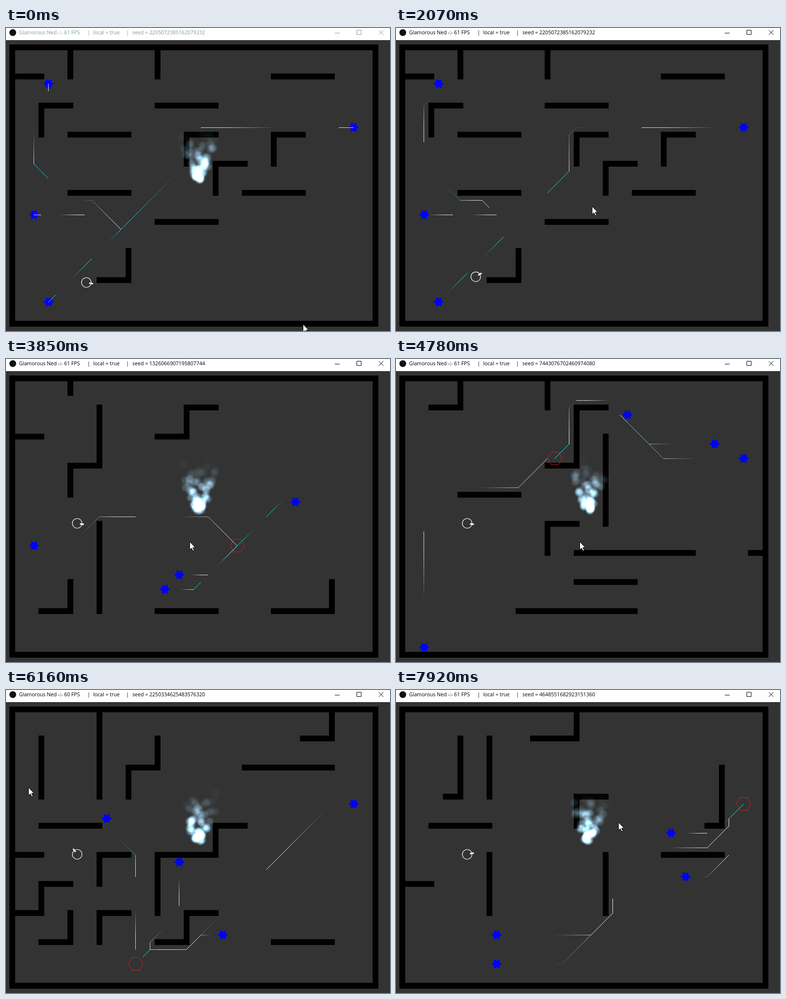
Recreate the animation shown at these times as an HTML page with a canvas. Size 793 px wide and 625 px high, loop 8000 ms.

```html
<!DOCTYPE html>
<html lang="en">
<head>
<meta charset="utf-8">
<title>Maze</title>
<style>
  html, body { margin: 0; width: 100%; height: 100%; overflow: hidden; background: #333; }
  canvas { position: absolute; left: 0; top: 0; }
  #bar {
    position: absolute; left: 0; top: 0; width: 793px; height: 25px; background: #fff;
    font: 10.6px/19px "Open Sans", "Noto Sans", sans-serif; color: #000; white-space: pre;
  }
  #bar.idle { color: #7f9a9c; }
  #bar span { position: absolute; top: 0; }
  #bar svg { position: absolute; left: 0; top: 0; fill: none; stroke: currentColor; }
</style>
</head>
<body>
<div id="bar">
  <svg width="793" height="25">
    <circle cx="14" cy="9.5" r="7" fill="#111" stroke="none"/>
    <path d="M679 10.5h10M724.5 4.5h9v9h-9zM770 4.5l9.5 9.5M779.5 4.5l-9.5 9.5"/>
  </svg>
  <span id="name" style="left:27px"></span>
  <span style="left:168px">|</span>
  <span style="left:180px">local = true</span>
  <span style="left:248px">|</span>
  <span id="seed" style="left:261px"></span>
</div>
<canvas id="stage" width="793" height="625"></canvas>
<script>
const LOOP = 8000, FRAME = 76.9, PERIOD = 1295, CELL = 15;
const ctx = document.getElementById('stage').getContext('2d');
const bar = document.getElementById('bar');
const nameLabel = document.getElementById('name');
const seedLabel = document.getElementById('seed');

const toGoalC = ' 433,85 373,85 358,100 358,175 c328,205';
const toGoalF = ' 448,460 448,430 553,325 643,325 688,280 688,265 c718,235';

// Walls are in units of 60 px; a leading "c" marks a cyan stretch of a route.
// "phase" is the state of the pulses at time "at".
const levels = [
  { start: 0, seed: '2205072385162079232', fps: 61, at: 0, phase: .13,
    walls: '0,1 1,1|2,0 2,1|5,0 5,1|9,1 11,1|1,3 1,2 2,2|5,2 7,2|2,3 4,3|6,4 6,3 7,3|9,4 9,3 10,3|' +
      '7,5 7,4 8,4|8,5 10,5|2,5 4,5|5,6 7,6|3,8 4,8 4,7',
    routes: ['718,205 373,205 358,220 358,295 c238,415',
      '88,115 88,130 58,160 58,280 c133,355 178,355 238,415',
      '58,385 208,385 238,415', '88,565 c238,415'] },
  { start: 3250, seed: '1326066907195807744', fps: 61, at: 3850, phase: .03, goal: [478, 385],
    walls: '2,0 2,.5|0,2 1,2|3,1 3,3 2,3 2,4|5,2 6,2 6,1 7,1|3,5 3,8|1,8 2,8 2,7|5,8 7,8|9,8 11,8 11,7',
    routes: ['58,385 133,385 193,325 418,325 478,385', '328,475 388,475 c478,385',
      '358,445 418,445 478,385', '598,295 568,295 c478,385'] },
  { start: 4150, seed: '7443076702460974080', fps: 61, at: 4780, phase: .98, goal: [328, 205],
    walls: '1,1 2,1 2,0|5,0 5,1|7,1 6,1 6,3 5,3|7,2 7,5|2,4 4,4|6,5 5,5 5,6|6,6 10,6|12,6 12.5,6|6,7 8,7|4,8 8,8',
    routes: ['718,205 553,205 c478,130' + toGoalC, '658,175 523,175 c478,130' + toGoalC,
      '478,115 478,100 463,85' + toGoalC, '58,595 58,355 148,265 253,265 313,205 328,205'] },
  { start: 5040, seed: '2250334625483576320', fps: 60, at: 6160, phase: .8, goal: [268, 565],
    walls: '1,1 1,3|3,0 3,3|5,1 5,2 4,2 4,3|10,1 11,1 11,0|8,2 11,2|1,4 3,4|0,5 1,5|0,7 1,7 1,6 2,6|' +
      '3,6 3,5 4,5|3,8 3,7 4,7|1,8 2,8 2,7|5,7 5,5 7,5 7,4 8,4|5,8 6,8 6,7 7,7|9,8 11,8',
    routes: ['718,235 673,235 538,370 373,535 298,535 c268,565', '448,505 403,505 373,535 298,535 c268,565',
      '358,355 358,460 298,520 298,535 c268,565', '208,265 208,280 c268,340 268,565'] },
  { start: 6700, seed: '4648551682923151360', fps: 61, at: 7920, phase: .97, goal: [718, 235],
    walls: '6,0 6,1 4.5,1|2,1 2,3 1.5,3|3,1 3,3|6,4 6,3 7,3|1,4 3,4|3,5 3,7|7,5 7,7|0,6 1,6|9,5 11,5|11,2 11,4 10.5,4',
    routes: ['568,295 658,295 688,265 c718,235', '598,385 643,385 688,340 688,265 c718,235',
      '208,505 403,505' + toGoalF, '208,565 343,565' + toGoalF] }
];

const cursorKeys = [[0, 613, 611], [1310, 467, 346], [2500, 379, 377], [5160, 379, 377],
  [6010, 46, 201], [6400, 46, 201], [7700, 459, 273]];
const shipKeys = [[0, 166, 525], [1900, 166, 525], [2850, 152, 393], [3250, 147, 339]];
// Bullets: first time, last time, start x, y, then velocity in px/s.
const bullets = [[1080, 1560, 166, 525, -283, -274], [1200, 1300 + 90, 166, 525, 310, -182],
  [2450, 3100, 156, 400, 400, 37.5]];

const parsePoints = s => s.split(' ').map(p => {
  const [x, y] = p.replace('c', '').split(',').map(Number);
  return { x, y, cyan: p[0] === 'c' };
});

function parseRoute(text) {
  const points = parsePoints(text);
  let length = 0;
  const legs = points.slice(1).map((b, i) => {
    const a = points[i], span = Math.max(Math.abs(b.x - a.x), Math.abs(b.y - a.y));
    const leg = { a, b, span, from: length };
    length += span;
    return leg;
  });
  return { start: points[0], legs, length };
}

for (const level of levels) {
  level.walls = level.walls.split('|').map(parsePoints);
  level.routes = level.routes.map(parseRoute);
}

const levelAt = t => levels.filter(l => l.start <= t).pop() || levels[0];
const random = n => { const v = Math.sin(n * 127.1 + 11.7) * 43758.5453; return v - Math.floor(v); };

function along(keys, t) {
  const i = keys.findIndex(k => k[0] > t);
  if (i < 0) return keys[keys.length - 1].slice(1);
  const [t0, x0, y0] = keys[i - 1], [t1, x1, y1] = keys[i];
  const u = (t - t0) / (t1 - t0), e = u * u * (3 - 2 * u);
  return [x0 + (x1 - x0) * e, y0 + (y1 - y0) * e];
}

function polygon(x, y, corners, radius) {
  ctx.beginPath();
  for (let i = 0; i < corners; i++) {
    const a = i / corners * 2 * Math.PI, r = radius(i);
    ctx.lineTo(x + r * Math.cos(a), y + r * Math.sin(a));
  }
  ctx.closePath();
}

function drawWalls(walls) {
  ctx.strokeStyle = '#000';
  ctx.lineWidth = 12;
  ctx.lineCap = 'square';
  ctx.strokeRect(13, 40, 750, 570);
  for (const wall of walls) {
    ctx.beginPath();
    wall.forEach(p => ctx.lineTo(13 + p.x * 60, 40 + p.y * 60));
    ctx.stroke();
  }
  ctx.lineCap = 'butt';
}

function drawPulse(route, head) {
  const tail = head - route.length * .27;
  for (const { a, b, span, from } of route.legs) {
    const lo = Math.max(tail, from), hi = Math.min(head, from + span);
    for (let d = lo; d < hi; d += 5) {
      const end = Math.min(d + 5, hi), u = (d - from) / span, v = (end - from) / span;
      ctx.globalAlpha = Math.min(.9, 1.3 * (end - tail) / (head - tail));
      ctx.strokeStyle = b.cyan ? '#00ffff' : '#f4f4f4';
      ctx.beginPath();
      ctx.moveTo(a.x + (b.x - a.x) * u - .5, a.y + (b.y - a.y) * u + .5);
      ctx.lineTo(a.x + (b.x - a.x) * v - .5, a.y + (b.y - a.y) * v + .5);
      ctx.stroke();
    }
  }
  ctx.globalAlpha = 1;
}

function drawRoutes(level, t) {
  const turns = level.phase + (t - level.at) / PERIOD + 10;
  const phase = turns - Math.floor(turns);
  ctx.fillStyle = '#00f';
  for (const { start } of level.routes) {
    polygon(start.x, start.y, 12, i => i % 2 ? 6.8 : 11);
    ctx.fill();
  }
  ctx.lineWidth = 1;
  if (level.goal) {
    ctx.strokeStyle = '#d02020';
    polygon(...level.goal, 6, () => 15);
    ctx.stroke();
  }
  for (const route of level.routes)
    for (let n = 0; n < 3; n++)
      drawPulse(route, Math.round((phase + n) / 2 * route.length / CELL) * CELL);
}

const puff = document.createElement('canvas');
puff.width = puff.height = 24;
{
  const p = puff.getContext('2d'), g = p.createRadialGradient(12, 12, 0, 12, 12, 10);
  g.addColorStop(0, 'rgba(125,175,205,.85)');
  g.addColorStop(.55, 'rgba(115,165,195,.65)');
  g.addColorStop(1, 'rgba(100,150,180,0)');
  p.fillStyle = g;
  p.fillRect(0, 0, 24, 24);
}

function drawSmoke(t) {
  const gap = 17, life = 950;
  ctx.globalCompositeOperation = 'lighter';
  for (let i = Math.ceil((t - life) / gap); i * gap <= t; i++) {
    const born = i * gap;
    if (born > 300 && born < 2100) continue;
    const age = (t - born) / life, side = random(i) * 2 - 1;
    const x = 398 + side * (4 + 36 * Math.pow(age, .75));
    const y = 313 - age * (75 + 35 * random(i + .5));
    ctx.globalAlpha = .85 * Math.pow(1 - age, 1.15);
    ctx.drawImage(puff, x - 12, y - 12);
  }
  ctx.globalAlpha = 1;
  ctx.globalCompositeOperation = 'source-over';
}

function drawShip([x, y], [cx, cy]) {
  ctx.save();
  ctx.translate(x, y);
  ctx.strokeStyle = '#fff';
  ctx.lineWidth = 1.2;
  ctx.beginPath();
  ctx.arc(0, 0, 10, 0, 7);
  ctx.stroke();
  ctx.rotate(Math.atan2(cy - y, cx - x));
  ctx.fillStyle = '#fff';
  ctx.fillRect(6, -1.5, 8, 3);
  ctx.restore();
}

function drawBullets(t) {
  ctx.fillStyle = '#fff';
  for (const [from, to, x, y, vx, vy] of bullets) {
    if (t < from || t > to) continue;
    const s = (t - from) / 1000;
    ctx.beginPath();
    ctx.arc(x + vx * s, y + vy * s, 3, 0, 7);
    ctx.fill();
  }
}

const arrow = new Path2D('M0 0V16.5L3.8 13L6.4 19L9 17.9L6.4 12H11.5Z');
function drawCursor([x, y]) {
  ctx.save();
  ctx.translate(x + .5, y);
  ctx.fillStyle = '#fff';
  ctx.strokeStyle = '#000';
  ctx.lineWidth = 1;
  ctx.fill(arrow);
  ctx.stroke(arrow);
  ctx.restore();
}

function setText(node, text) {
  if (node.textContent !== text) node.textContent = text;
}

function render(t) {
  const level = levelAt(t), titled = levelAt(t - 200), cursor = along(cursorKeys, t);
  setText(nameLabel, `Glamorous Ned -:- ${titled.fps} FPS`);
  setText(seedLabel, `seed = ${titled.seed}`);
  bar.className = t < 1050 ? 'idle' : '';
  ctx.clearRect(0, 0, 793, 625);
  ctx.fillStyle = '#333';
  ctx.fillRect(0, 25, 793, 600);
  drawWalls(level.walls);
  drawRoutes(level, t);
  drawSmoke(t);
  drawBullets(t);
  drawShip(along(shipKeys, t), cursor);
  drawCursor(cursor);
}

const began = performance.now();
function tick() {
  const t = (performance.now() - began) % LOOP;
  render(Math.floor((t + 8) / FRAME) * FRAME);
  requestAnimationFrame(tick);
}
tick();
</script>
</body>
</html>
```
